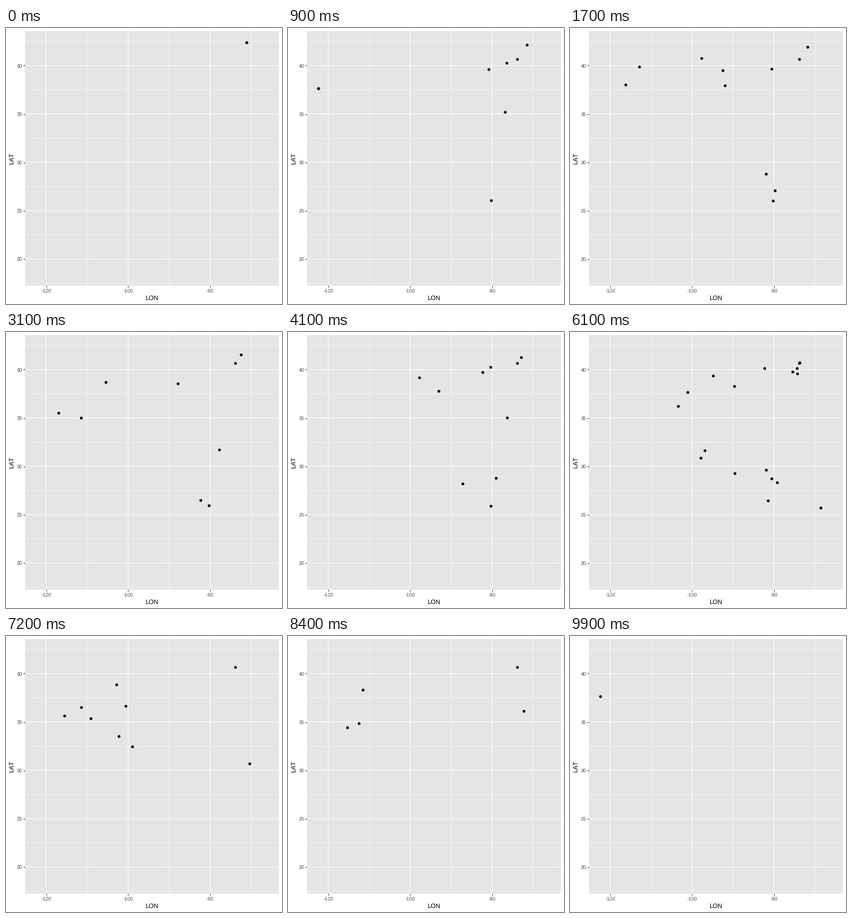
These frames come from a looping animation (480 by 480 pixels, 10000 ms). A matplotlib script:

```python
import numpy as np
import matplotlib.pyplot as plt
from matplotlib.animation import FuncAnimation

SIZE, DPI = 480, 72
FRAMES, INTERVAL = 100, 100
LEFT, RIGHT, TOP, BOTTOM = 33.05, 474.52, 5.48, 448.3

# Airport positions as (longitude, latitude)
PORTS = {
    "ABQ": (-106.61, 35.04), "BOS": (-71.01, 42.364), "DCA": (-77.04, 38.85),
    "FLL": (-80.15, 26.07), "JFK": (-73.78, 40.64), "LAS": (-115.15, 36.08),
    "LAX": (-118.41, 33.94), "MIA": (-80.29, 25.79), "ORD": (-87.90, 41.98),
    "RDU": (-78.79, 35.88), "RSW": (-81.76, 26.54), "SFO": (-122.375, 37.62),
    "SJC": (-121.93, 37.36), "SJU": (-66.00, 18.44), "SLC": (-111.98, 40.79),
    "TPA": (-82.53, 27.98),
}

# Origin, destination, departure and arrival in frames
FLIGHTS = [
    ("BOS", "JFK", 0, 63), ("BOS", "TPA", 0, 18),
    ("JFK", "JFK", 4, 94), ("JFK", "LAX", 4, 36), ("JFK", "LAX", 4, 90),
    ("FLL", "MIA", 4, 58), ("SFO", "JFK", 9, 22), ("SFO", "JFK", 9, 72),
    ("SLC", "LAX", 14, 36), ("SLC", "JFK", 14, 22), ("FLL", "JFK", 14, 58),
    ("MIA", "ABQ", 27, 81), ("JFK", "SFO", 32, 99), ("JFK", "LAS", 32, 76),
    ("FLL", "JFK", 36, 63), ("JFK", "LAX", 45, 90), ("RDU", "JFK", 45, 63),
    ("SJU", "JFK", 45, 58), ("SJU", "JFK", 45, 94), ("ORD", "JFK", 49, 58),
    ("FLL", "SJC", 50, 76), ("FLL", "ABQ", 50, 81),
    ("JFK", "FLL", 50, 63), ("JFK", "RSW", 50, 63),
    ("ORD", "FLL", 54, 63), ("FLL", "RSW", 54, 63), ("DCA", "JFK", 59, 63),
]

START = np.array([PORTS[a] for a, _, _, _ in FLIGHTS])
END = np.array([PORTS[b] for _, b, _, _ in FLIGHTS])
DEP = np.array([d for _, _, d, _ in FLIGHTS], float)
ARR = np.array([a for _, _, _, a in FLIGHTS], float)

# Unhinted, unkerned text keeps the natural letter widths
plt.rcParams.update({"font.family": "Liberation Sans",
                     "text.hinting": "none", "text.kerning_factor": 6})

fig = plt.figure(figsize=(SIZE / DPI, SIZE / DPI), dpi=DPI, facecolor="white")
ax = fig.add_axes([LEFT / SIZE, 1 - BOTTOM / SIZE,
                   (RIGHT - LEFT) / SIZE, (BOTTOM - TOP) / SIZE],
                  facecolor="#E5E5E5")
ax.patch.set_snap(False)
ax.set_axisbelow(True)
for spine in ax.spines.values():
    spine.set_visible(False)

# Limits are the range of all airports plus 5 % on each side
places = np.array(list(PORTS.values()))
low, high = places.min(axis=0), places.max(axis=0)
pad = 0.05 * (high - low)
ax.set_xlim(low[0] - pad[0], high[0] + pad[0])
ax.set_ylim(low[1] - pad[1], high[1] + pad[1])


def set_ticks(axis, major, minor):
    axis.set_ticks(major, labels=[str(v) for v in major])
    axis.set_ticks(minor, minor=True)


set_ticks(ax.xaxis, [-120, -100, -80], [-110, -90, -70])
set_ticks(ax.yaxis, [20, 25, 30, 35, 40], [17.5, 22.5, 27.5, 32.5, 37.5, 42.5])
ax.tick_params(which="major", length=2.75, width=1.07, pad=2.2,
               color="#333333", labelcolor="#4D4D4D", labelsize=8.8)
ax.tick_params(which="minor", length=0)
ax.grid(which="major", color="white", linewidth=1.07, snap=False)
ax.grid(which="minor", color="white", linewidth=0.53, snap=False)


def title(x, y, text, angle=0):
    fig.text(x / SIZE, 1 - y / SIZE, text, size=11, color="black", rotation=angle,
             rotation_mode="anchor", ha="center", va="baseline")


title((LEFT + RIGHT) / 2, 473, "LON")
title(13.3, (TOP + BOTTOM) / 2, "LAT", 90)

dots = ax.scatter(START[:, 0], START[:, 1], s=[4.9 ** 2] * len(FLIGHTS),
                  color="black", linewidths=0, zorder=3)


def update(t):
    share = ((t - DEP) / (ARR - DEP))[:, None]
    pos = START + (END - START) * share
    # A dot vanishes on landing, except in the closing frame
    flying = (DEP <= t) & ((t < ARR) | ((t == ARR) & (t == FRAMES - 1)))
    pos[~flying] = np.nan
    dots.set_offsets(pos)
    return dots,


anim = FuncAnimation(fig, update, frames=FRAMES, interval=INTERVAL,
                     init_func=lambda: update(0), repeat=True, repeat_delay=0)
plt.show()
```
